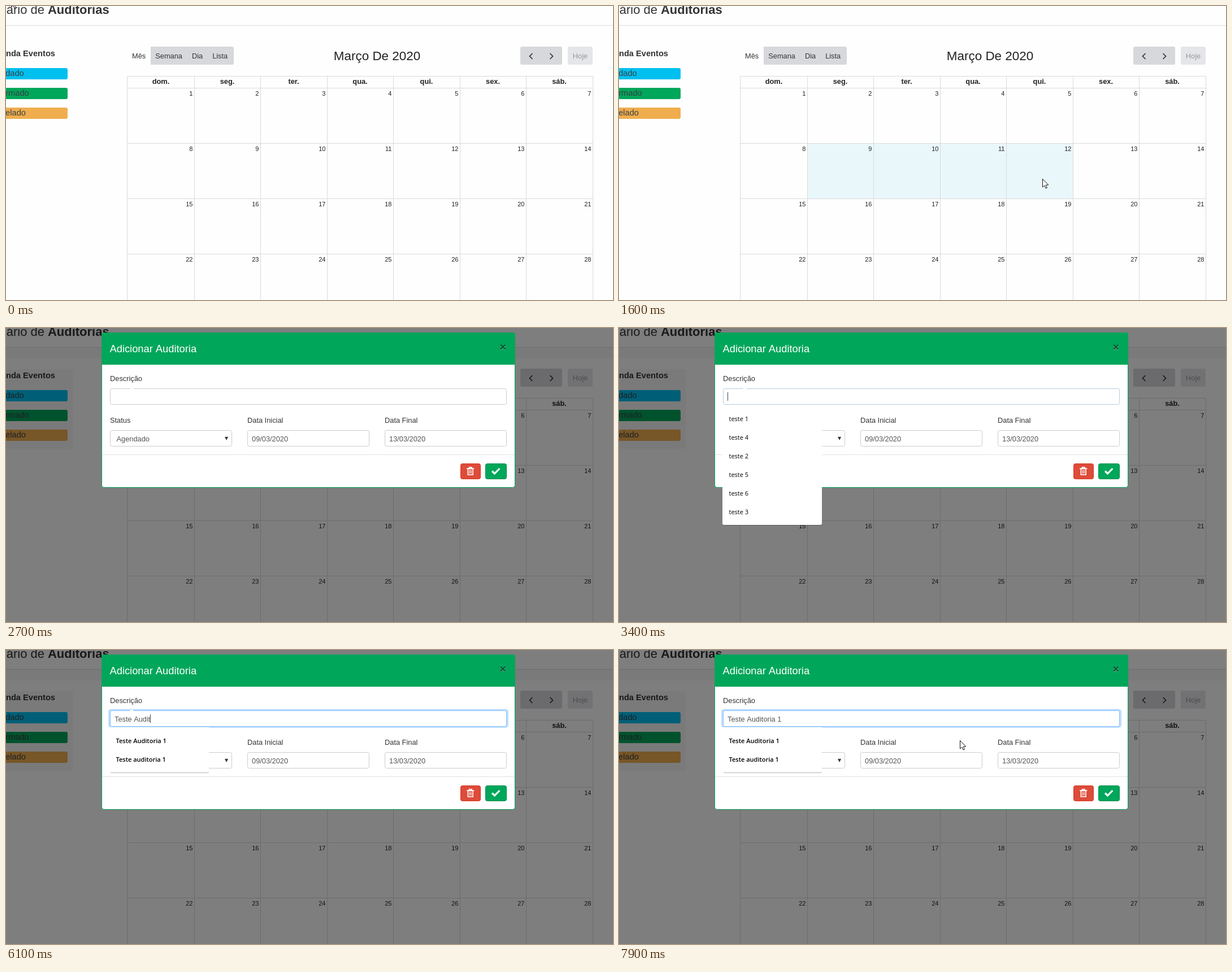
An HTML page with a canvas that plays this animation: 1074 px wide and 521 px high, repeating every 8 s.

```html
<!DOCTYPE html>
<html lang="pt">
<head>
<meta charset="utf-8">
<style>
html, body { margin: 0; width: 100%; height: 100%; overflow: hidden; background: #fff; }
canvas { display: block; }
</style>
</head>
<body>
<canvas id="stage" width="1074" height="521"></canvas>
<script>
const ctx = document.getElementById('stage').getContext('2d');
const W = 1074, H = 521, LOOP = 8000, STEP = 100;
const SANS = '"Liberation Sans", Arial, sans-serif';
const UI = '"Open Sans", "Noto Sans", sans-serif';
const BASE = 12.82;
const GREEN = '#00a65a', GRID = '#d9dadc', INPUT = '#cbcccd';
const SELECT = 1200, MODAL = 1900, FOCUS = 3100, LIST = 3400;

const DAYS = ['dom.', 'seg.', 'ter.', 'qua.', 'qui.', 'sex.', 'sáb.'];
const colX = i => Math.round(215.2 + 117.5 * i);
const rowY = i => Math.round(144.5 + 98.2 * i);

// Pointer moves along quadratic curves and rests at each end until hidden.
const MOVES = [
  { start: 100, end: 800, from: [9, -13], bend: [1650, 460], to: [437, 298] },
  { start: SELECT, end: 1600, from: [437, 298], bend: [590, 302], to: [749, 306] },
  { start: 2100, end: 2700, from: [749, 306], bend: [-40, 105], to: [222, 115], hide: 2700 },
  { start: 7700, end: 7900, show: 7600, from: [560, 145], bend: [585, 153], to: [603, 160] }
];

// Each word is typed as a burst with its own steady pace.
const BURSTS = [
  { word: 'Teste ', start: 4200, pace: 125 },
  { word: 'Auditoria 1', start: 5200, pace: 190 }
];

function pointerAt(t) {
  const move = MOVES.filter(m => t >= (m.show ?? m.start)).pop() || MOVES[0];
  if (t >= move.hide) return null;
  const s = Math.min(1, Math.max(0, (t - move.start) / (move.end - move.start)));
  return [0, 1].map(k => (1 - s) ** 2 * move.from[k] + 2 * s * (1 - s) * move.bend[k] + s * s * move.to[k]);
}

function typedAt(t) {
  return BURSTS.map(b => b.word.slice(0, Math.max(0, 1 + Math.floor((t - b.start) / b.pace)))).join('');
}

function text(str, x, y, { size = BASE, color = '#333', align = 'left', weight = 400, family = SANS } = {}) {
  ctx.font = `${weight} ${size}px ${family}`;
  ctx.fillStyle = color;
  ctx.textAlign = align;
  ctx.fillText(str, x, y);
}

function rect(x, y, w, h, color) {
  ctx.fillStyle = color;
  ctx.fillRect(x, y, w, h);
}

function box(x, y, w, h, radius, fill, stroke) {
  const inset = stroke ? 0.5 : 0;
  ctx.beginPath();
  ctx.roundRect(x + inset, y + inset, w - 2 * inset, h - 2 * inset, radius);
  ctx.fillStyle = fill;
  ctx.fill();
  if (stroke) {
    ctx.strokeStyle = stroke;
    ctx.lineWidth = 1;
    ctx.stroke();
  }
}

function line(points, color, width) {
  ctx.beginPath();
  points.forEach(([x, y]) => ctx.lineTo(x, y));
  ctx.strokeStyle = color;
  ctx.lineWidth = width;
  ctx.stroke();
}

function drawSidebar(dimmed) {
  if (dimmed) {
    rect(0, 35, W, 19, '#f5f5f5');
    rect(0, 73, 118, 141, '#f5f5f5');
  }
  text('Diário de ', 74, 14, { size: 21.97, align: 'right' });
  text('Auditorias', 74, 14, { size: 21.97, weight: 700 });
  rect(0, 34, W, 1, '#dcdcdc');
  text('Legenda Eventos', 87, 89, { size: 14.65, weight: 700, align: 'right' });
  const legend = [['Agendado', '#00c0ef'], ['Confirmado', GREEN], ['Cancelado', '#f0ad4e']];
  legend.forEach(([label, color], i) => {
    const y = 110 + 35 * i;
    box(-10, y, 119, 20, 3, color);
    text(label, -35, y + 14, { size: 14.65, color: '#3a3f44' });
  });
}

function chevron(x, dir) {
  line([[x - 2.5 * dir, 84], [x + 2.5 * dir, 89], [x - 2.5 * dir, 94]], '#333', 1.7);
}

function drawToolbar() {
  const gray = '#d7d8dc';
  box(256, 72, 147, 32, [0, 3, 3, 0], gray);
  let x = 223;
  for (const label of ['Mês', 'Semana', 'Dia', 'Lista']) {
    text(label, x, 92.5);
    x += ctx.measureText(label).width + 17;
  }
  text('Março De 2020', 656.5, 96, { size: 22.43, color: '#222', align: 'center' });
  box(910, 72, 74, 32, 3, gray);
  chevron(929, -1);
  chevron(965, 1);
  box(994, 72, 44, 32, 3, '#e5e6e9');
  text('Hoje', 1016, 92.5, { color: '#96989c', align: 'center' });
}

function drawCalendar(t, pointer) {
  if (t >= SELECT && t < MODAL) {
    const last = Math.floor((pointer[0] - colX(0)) / 117.5);
    rect(colX(1), rowY(1), colX(last + 1) - colX(1), rowY(2) - rowY(1), '#e9f7fb');
  }
  rect(215, 124, 824, 1, GRID);
  for (let i = 0; i < 4; i++) rect(215, rowY(i), 824, 1, GRID);
  for (let i = 0; i <= 7; i++) rect(i ? colX(i) : 214, 124, 1, H - 124, GRID);
  DAYS.forEach((d, i) =>
    text(d, (colX(i) + colX(i + 1)) / 2, 138, { weight: 700, color: '#222', align: 'center' }));
  for (let n = 0; n < 28; n++) {
    text(n + 1, colX(n % 7 + 1) - 2.6, rowY(Math.floor(n / 7)) + 14,
      { size: 11, color: '#222', align: 'right' });
  }
}

function drawTrash() {
  ctx.strokeStyle = '#fff';
  ctx.lineWidth = 1.6;
  ctx.strokeRect(817.3, 249.5, 8.8, 10.5);
  rect(815, 248.3, 13.4, 1.6, '#fff');
  ctx.strokeRect(819.5, 246.8, 4.5, 2);
  for (let i = 0; i < 3; i++) rect(819.4 + 1.8 * i, 251.7, 0.9, 6.2, '#fff');
}

function drawModal(t) {
  rect(0, 0, W, H, 'rgba(0,0,0,.5)');
  box(169, 8, 732, 275, 4, '#fff', GREEN);
  box(169, 8, 732, 57, [4, 4, 0, 0], GREEN);
  text('Adicionar Auditoria', 183.5, 43, { size: 18.31, color: '#fff' });
  const cross = { size: 19.2, weight: 700, align: 'center' };
  text('×', 879, 40.5, { ...cross, color: 'rgba(255,255,255,.35)' });
  text('×', 879, 39.5, { ...cross, color: 'rgba(0,0,0,.62)' });

  text('Descrição', 184, 94);
  const fields = [['Status', 'Agendado', 11.5], ['Data Inicial', '09/03/2020', 8], ['Data Final', '13/03/2020', 8]];
  fields.forEach(([label, value, pad], i) => {
    const x = 184 + 243 * i;
    text(label, x, 168);
    box(x, 181, 216, 29, 3, '#fff', INPUT);
    text(value, x + pad, 200.5, { color: '#555' });
  });
  text('▼', 390.2, 198, { size: 8, align: 'center', family: '"DejaVu Sans", sans-serif' });

  rect(170, 224, 730, 1, '#dfe3e6');
  box(804, 240, 36, 28, 3, '#dd4b39', '#d73925');
  drawTrash();
  box(848, 240, 38, 28, 3, GREEN, '#008d4c');
  line([[860, 253.5], [864.5, 258], [873.3, 249]], '#fff', 3.2);
  drawDescription(t);
  if (t >= LIST) drawSuggestions(t >= BURSTS[1].start);
}

function drawDescription(t) {
  const glow = t > LIST;
  if (glow) box(181, 104.5, 708, 33.5, 5, '#bfdeff');
  box(184, 107, 702, 29, 3, '#fff', glow ? '#80bdff' : t >= FOCUS ? '#b4cbdc' : INPUT);
  // Upper end of the text cursor resting over the border.
  if (t >= 2700 && t < 7500) rect(219.5, 106, 6, 2, '#fff');

  const value = typedAt(t);
  text(value, 192, 126.5, { color: '#555' });
  const caretOn = t >= FOCUS && t < 7600 && (t < 3900 || value);
  if (caretOn) rect(Math.round(192 + ctx.measureText(value).width), 114, 1, 15, '#444');
}

function drawSuggestions(filtered) {
  const items = filtered ? ['Teste Auditoria 1', 'Teste auditoria 1'] : [1, 4, 2, 5, 6, 3].map(n => 'teste ' + n);
  const bottom = 151 + 33 * items.length;
  box(184, bottom - 8, 175, 9, [0, 0, 3, 3], 'rgba(0,0,0,.3)');
  box(183, 137, 176, bottom - 137, [0, 0, 3, 3], '#fff');
  items.forEach((s, i) => text(s, 194.5, 164.5 + 33 * i,
    { size: 11, family: UI, weight: filtered ? 600 : 500, color: '#000' }));
}

function drawPointer([x, y]) {
  ctx.save();
  ctx.translate(Math.round(x) + 0.5, Math.round(y) + 0.5);
  ctx.beginPath();
  [[0, 0], [0, 14.5], [3.3, 11.5], [5.6, 16.6], [7.9, 15.6], [5.7, 10.7], [10.2, 10.5]]
    .forEach(([px, py]) => ctx.lineTo(px, py));
  ctx.closePath();
  ctx.fillStyle = '#fff';
  ctx.fill();
  ctx.strokeStyle = '#111';
  ctx.lineWidth = 1;
  ctx.stroke();
  ctx.restore();
}

function draw(t) {
  const pointer = pointerAt(t);
  const modal = t >= MODAL;
  rect(0, 0, W, H, '#fefefe');
  drawSidebar(modal);
  drawToolbar();
  drawCalendar(t, pointer);
  if (modal) drawModal(t);
  if (pointer) drawPointer(pointer);
}

const start = performance.now();
function tick() {
  const t = (performance.now() - start) % LOOP;
  draw(Math.floor(t / STEP) * STEP);
  requestAnimationFrame(tick);
}
tick();
</script>
</body>
</html>
```
